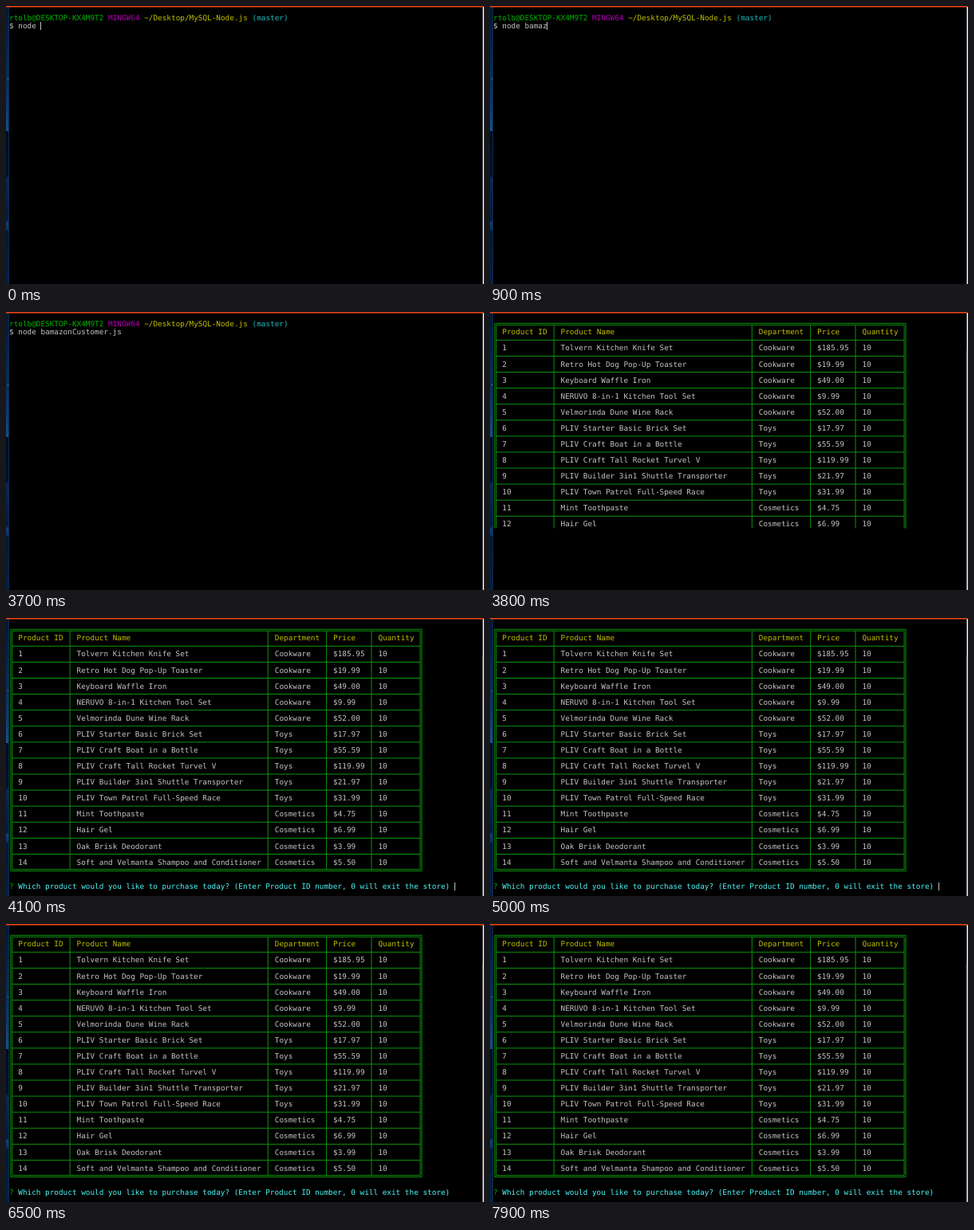
An HTML page that plays this animation: 599x349 px, repeating every 8 s.

```html
<!DOCTYPE html>
<html lang="en">
<head>
<meta charset="utf-8">
<title>Terminal store</title>
<style>
html, body { margin: 0; width: 100%; height: 100%; overflow: hidden; background: #000; }
svg { display: block; width: 599px; height: 349px; }
text {
  font-family: "DejaVu Sans Mono", monospace;
  font-size: 9.368px;
  white-space: pre;
  text-rendering: geometricPrecision;
}
</style>
</head>
<body>
<svg id="stage" viewBox="0 0 599 349" xmlns="http://www.w3.org/2000/svg">
  <defs>
    <linearGradient id="desk" x1="0" y1="0" x2="0" y2="1">
      <stop offset="0" stop-color="#051634"/>
      <stop offset=".22" stop-color="#0a2a58"/>
      <stop offset=".36" stop-color="#0e3a70"/>
      <stop offset=".449" stop-color="#174f8c"/>
      <stop offset=".45" stop-color="#030a1c"/>
      <stop offset=".61" stop-color="#04102a"/>
      <stop offset=".62" stop-color="#0a2854"/>
      <stop offset=".77" stop-color="#061a3c"/>
      <stop offset=".78" stop-color="#11407a"/>
      <stop offset=".805" stop-color="#0c3060"/>
      <stop offset=".81" stop-color="#051633"/>
      <stop offset="1" stop-color="#072046"/>
    </linearGradient>
    <clipPath id="painted"><rect id="paintBox" width="599" height="349"/></clipPath>
  </defs>
  <rect width="599" height="349"/>
  <rect width="3" height="349" fill="url(#desk)"/>
  <rect x="3" width="1" height="349" fill="#0a2d45"/>
  <rect x="2" y="91" width="1" height="1" fill="#7f9bb5"/>
  <rect x="597.5" y="1" width="1.5" height="348" fill="#efefef"/>
  <rect id="thumb" x="597.5" y="48" width="1.5" height="301" fill="#cdcdcd"/>
  <rect width="598" height="1.5" fill="#f24a12"/>
  <g id="shell"></g>
  <g id="table" clip-path="url(#painted)"></g>
  <g id="prompt"></g>
  <rect id="cursor" width="1" height="10" fill="#bfbfbf"/>
</svg>
<script>
const LOOP = 8000, CW = 5.64, LH = 10.045, LEFT = 4, TOP = 10.2;
const GREEN = '#00b400', YELLOW = '#bfbf00', GREY = '#c4c4c4', LINE = '#0d930d';
const $ = id => document.getElementById(id);
const colX = c => LEFT + c * CW;
const midX = c => colX(c + 0.5);
const midY = r => TOP + (r + 0.5) * LH;

function add(parent, tag, attrs) {
  const el = document.createElementNS('http://www.w3.org/2000/svg', tag);
  for (const k in attrs) el.setAttribute(k, attrs[k]);
  return parent.appendChild(el);
}

function write(parent, col, row, str, fill) {
  const el = add(parent, 'text', { x: colX(col), y: TOP + row * LH + 8.1, fill });
  el.textContent = str;
  return el;
}

// Shell prompt
const shell = $('shell');
write(shell, 0, 0, 'rtolb@DESKTOP-KX4M9T2', GREEN);
write(shell, 22, 0, 'MINGW64', '#b000b0');
write(shell, 30, 0, '~/Desktop/MySQL-Node.js', YELLOW);
write(shell, 54, 0, '(master)', '#1fb8b8');
const command = write(shell, 0, 1, '', GREY);

// Product table
const goods = [
  ['Tolvern Kitchen Knife Set', '185.95'],
  ['Retro Hot Dog Pop-Up Toaster', '19.99'],
  ['Keyboard Waffle Iron', '49.00'],
  ['NERUVO 8-in-1 Kitchen Tool Set', '9.99'],
  ['Velmorinda Dune Wine Rack', '52.00'],
  ['PLIV Starter Basic Brick Set', '17.97'],
  ['PLIV Craft Boat in a Bottle', '55.59'],
  ['PLIV Craft Tall Rocket Turvel V', '119.99'],
  ['PLIV Builder 3in1 Shuttle Transporter', '21.97'],
  ['PLIV Town Patrol Full-Speed Race', '31.99'],
  ['Mint Toothpaste', '4.75'],
  ['Hair Gel', '6.99'],
  ['Oak Brisk Deodorant', '3.99'],
  ['Soft and Velmanta Shampoo and Conditioner', '5.50']
];
const table = $('table');
const cols = [2, 15, 59, 72, 82];
const x0 = midX(0), x1 = midX(91), y0 = midY(0), y1 = midY(30);

function rule(d) {
  add(table, 'path', { d, stroke: LINE, 'stroke-width': 1, fill: 'none' });
}
for (const o of [-1, 1]) {
  rule(`M${x0 + o} ${y0 + o}H${x1 - o}V${y1 - o}H${x0 + o}Z`);
}
for (const c of [13, 57, 70, 80]) rule(`M${midX(c)} ${y0 + 1}V${y1 - 1}`);
for (let r = 2; r < 30; r += 2) rule(`M${x0 + 1} ${midY(r)}H${x1 - 1}`);

function tableRow(row, cells, fill) {
  cells.forEach((s, i) => write(table, cols[i], row, s, fill));
}
tableRow(1, ['Product ID', 'Product Name', 'Department', 'Price', 'Quantity'], YELLOW);
goods.forEach(([name, price], i) => {
  const dept = i < 5 ? 'Cookware' : i < 10 ? 'Toys' : 'Cosmetics';
  tableRow(3 + 2 * i, [i + 1, name, dept, '$' + price, 10], GREY);
});

// Question below the table
const prompt = $('prompt');
write(prompt, 0, 32, '?', GREEN);
write(prompt, 2, 32, 'Which product would you like to purchase today? ' +
  '(Enter Product ID number, 0 will exit the store)', '#50f4f4');

// Key press times; the last one completes the file name
const FILE = 'bamazonCustomer.js ';
const keys = [300, 400, 500, 700, 900, 1000, 1100, 1300, 1500, 1600, 1700, 1800, 1900];
const ENTER = 3300, DRAW = 3800, ASK = 3900;

function cursorAt(t) {
  if (t >= ASK) return [99, 32, Math.floor((t - 3880) / 520) % 2 === 0];
  if (t >= ENTER) return [0, 2, t < 3600];
  const n = keys.filter(k => k <= t).length;
  const len = n === keys.length ? FILE.length : n;
  return [7 + len, 1, t < 2400 || t >= 3000];
}

function show(el, on) {
  el.setAttribute('visibility', on ? 'visible' : 'hidden');
}

function render(t) {
  const n = keys.filter(k => k <= t).length;
  command.textContent = '$ node ' + (n === keys.length ? FILE : FILE.slice(0, n));
  show(shell, t < DRAW);
  show(table, t >= DRAW);
  show($('thumb'), t >= DRAW);
  show(prompt, t >= ASK);
  $('paintBox').setAttribute('height', t < ASK ? 271.5 : 349);
  const [c, r, on] = cursorAt(t);
  const cur = $('cursor');
  cur.setAttribute('x', Math.round(colX(c) - 0.4));
  cur.setAttribute('y', Math.round(TOP + r * LH));
  show(cur, on && !(t >= DRAW && t < ASK));
}

const start = performance.now();
function tick() {
  render((performance.now() - start) % LOOP);
  requestAnimationFrame(tick);
}
tick();
</script>
</body>
</html>
```
